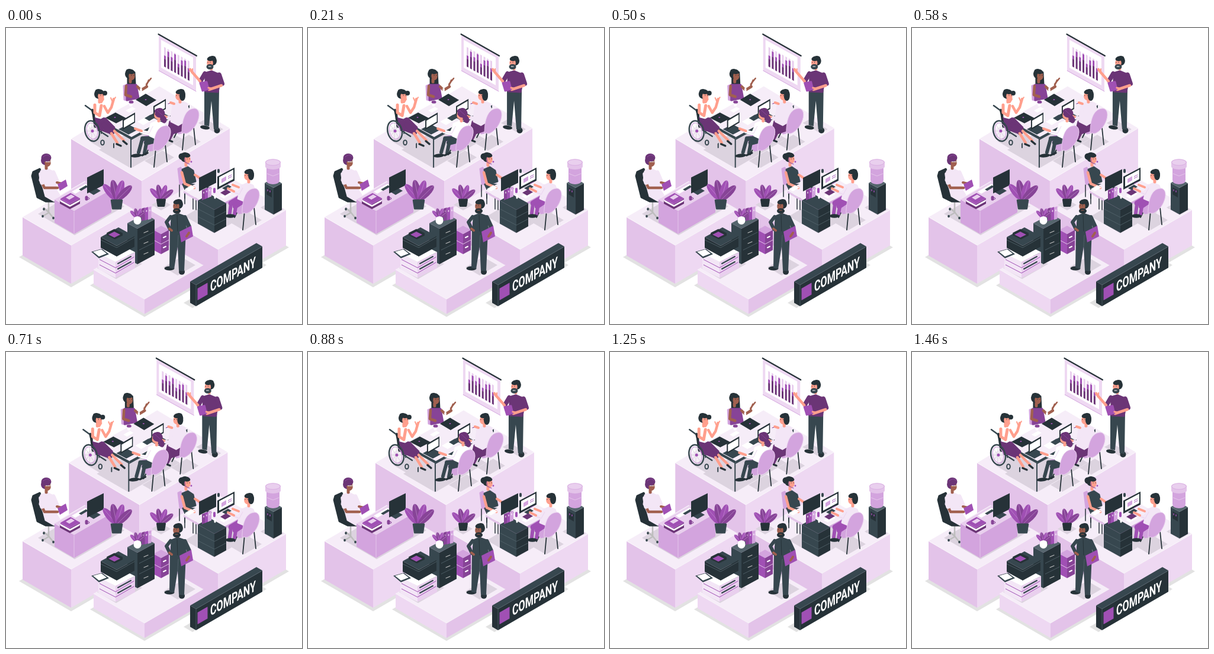
An HTML page with a canvas that plays this animation: 500 by 500 pixels, repeating every 1500 ms.

```html
<!DOCTYPE html>
<html lang="en">
<meta charset="utf-8">
<title>Company office</title>
<style>
html, body { margin: 0; width: 100%; height: 100%; overflow: hidden; background: #fff; }
canvas { display: block; width: 100vw; height: 100vh; }
</style>
<canvas id="stage" width="500" height="500"></canvas>
<script>
const ctx = document.getElementById('stage').getContext('2d');
const dark = '#263238', slate = '#37474f', steel = '#55656d', grey = '#bdbdbd', ground = '#e2e2e2', shade = '#dcd3df';
const purple = '#a050b4', plum = '#6b3576', grape = '#874497', lilac = '#d3a4de', white = '#fff';
const wallL = '#e3c3e9', wallR = '#eed8f2', floor = '#f6edf8', pale = '#e9cfee', shirt = '#f3e6f6';
const skin = '#ff9f8d', brown = '#a1604f', ISO = .58;
ctx.lineCap = ctx.lineJoin = 'round';

// Drawing helpers; points are flat x, y lists.
function trace(points) {
  ctx.beginPath();
  for (let i = 0; i < points.length; i += 2) ctx.lineTo(points[i], points[i + 1]);
}
function shape(color, ...points) {
  trace(points);
  ctx.fillStyle = color;
  ctx.fill();
}
function line(color, width, ...points) {
  trace(points);
  ctx.strokeStyle = color;
  ctx.lineWidth = width;
  ctx.stroke();
}
function dot(color, x, y, rx, ry = rx, turn = 0) {
  ctx.beginPath();
  ctx.ellipse(x, y, rx, ry, turn, 0, 7);
  ctx.fillStyle = color;
  ctx.fill();
}
function ring(color, width, x, y, rx, ry, turn = 0) {
  ctx.beginPath();
  ctx.ellipse(x, y, rx, ry, turn, 0, 7);
  ctx.strokeStyle = color;
  ctx.lineWidth = width;
  ctx.stroke();
}
// A polygon with softened corners.
function soft(color, ...points) {
  shape(color, ...points);
  ctx.closePath();
  ctx.strokeStyle = color;
  ctx.lineWidth = 3;
  ctx.stroke();
}
function at(x, y, draw) {
  ctx.save();
  ctx.translate(x, y);
  draw();
  ctx.restore();
}
// Isometric pieces: (x, y) is the front corner, a runs to the left and b to the right.
function flat(color, x, y, a, b, slope = ISO) {
  shape(color, x, y, x - a, y - a * slope, x - a + b, y - (a + b) * slope, x + b, y - b * slope);
}
function wall(color, x, y, width, height, slope = ISO) {
  const end = y - width * slope;
  shape(color, x, y, x + width, end, x + width, end + height, x, y + height);
}
function box(x, y, a, b, h, left, right, top, slope = ISO) {
  wall(left, x, y, -a, h, -slope);
  wall(right, x, y, b, h, slope);
  flat(top, x, y, a, b, slope);
}
function tier(x, y, a, b, h, left, right, slope) {
  box(x, y, a, b, h, left, right, floor, slope);
  line('#ffffffb0', .8, x - a, y - a * slope, x, y, x + b, y - b * slope);
}
function head(x, y, tone, hair, facing) {
  line(tone, 5, x - facing, y, x - facing, y + 11);
  dot(hair, x - facing * 2.5, y - 2.5, 7.5, 8);
  dot(tone, x + facing * 1.5, y + 1, 5.3, 7.2);
  dot(hair, x - facing, y - 6.5, 7.5, 4.2, facing * .2);
  for (const dx of [1, 5]) dot(dark, x + facing * dx, y, .6, .8);
}
function leaf(color, x, y, length, angle) {
  const cx = x + Math.sin(angle) * length / 2, cy = y - Math.cos(angle) * length / 2;
  dot(color, cx, cy, length / 5.5, length / 2, angle);
  line(lilac, .5, x, y, 2 * cx - x, 2 * cy - y);
}
function plant(x, y, length, spread, pot) {
  for (let i = 0; i < 4; i++) leaf(i % 2 ? grape : purple, x, y, length, (i - 1.4) * spread);
  soft(pot, x - length * .25, y, x + length * .25, y, x + length * .19, y + length * .4, x - length * .19, y + length * .4);
}
function chair() {
  line(dark, 1.8, 253, 203, 250, 235);
  line(dark, 1.8, 269, 197, 272, 226);
  line(dark, 1.8, 243, 200, 236, 214);
  soft(lilac, 231, 185, 239, 182, 260, 190, 256, 204, 244, 207, 238, 202);
  chairBack();
}
function chairBack() {
  ctx.beginPath();
  ctx.moveTo(249, 206);
  ctx.bezierCurveTo(249, 188, 253, 166, 270, 165);
  ctx.bezierCurveTo(286, 166, 276, 200, 257, 207);
  ctx.closePath();
  ctx.fillStyle = lilac;
  ctx.fill();
  ctx.strokeStyle = pale;
  ctx.lineWidth = .8;
  ctx.stroke();
}
function laptop(x, y) {
  flat(slate, x + 10, y + 25, 17, 16, .53);
  wall(dark, x, y, 21, 17);
  wall(white, x + 2, y + 1.5, 17.5, 12);
}
function screenBack(x, y, width, height) {
  line(slate, 3, x + width / 2, y + height / 2, x + width / 2, y + height - 2);
  wall(dark, x, y, width, height, .5);
}

function board() {
  wall(wallR, 258, 12, 63, 60, -.55);
  wall(white, 262, 20, 54, 47, -.55);
  [19, 29, 23, 31, 18, 27, 30, 20].forEach((height, i) => {
    const x = 267 + i * 5.7, base = 65 + i * 3.2, tip = height * .3;
    wall(pale, x, base - 33, 3, 33, -ISO);
    wall(purple, x, base - height, 3, tip, -ISO);
    wall(plum, x, base - height + tip, 3, height - tip, -ISO);
  });
  line(lilac, 1, 258, 72, 321, 107);
  line(dark, 2.2, 257.5, 10.5, 322, 47);
}
function presenter() {
  flat(shade, 355, 178, 30, 12);
  dot(dark, 336, 168, 8, 3.4, .15);
  dot(dark, 356.5, 173, 5, 5);
  shape(slate, 335, 105, 360, 105, 359, 172, 351, 171, 347, 123, 343, 166, 335, 164);
  soft(plum, 337, 76, 347, 73, 359, 78, 361, 92, 358, 108, 337, 107);
  line(plum, 7.5, 336, 77, 329, 89);
  line(skin, 4.5, 328, 90, 314, 74, 311, 70);
  line(skin, 2, 315, 75, 315, 69);
  line(plum, 8, 360, 79, 365, 94);
  line(skin, 4.5, 364, 97, 343, 104);
  soft(purple, 328, 93, 339, 91, 342, 103, 332, 106);
  line(skin, 3, 342, 101, 346, 102);
  head(346, 58, skin, dark, -1);
  dot(slate, 344.5, 65.5, 6, 4.6);
  line(white, 1, 342, 65, 346, 65);
}
function speaker() {
  soft(lilac, 199, 98, 204, 96, 206, 122, 200, 121);
  soft(dark, 206, 76, 217, 75, 218, 94, 206, 94);
  head(211, 80, brown, dark, 1);
  soft(grape, 204, 96, 220, 96, 224, 118, 204, 122);
  line(brown, 4.5, 203, 98, 202, 113, 211, 116);
  line(brown, 4.5, 222, 99, 228, 105, 238, 99);
  line(brown, 2.5, 236, 100, 241, 88);
  line(brown, 2.5, 237, 95, 245, 85);
}
function table() {
  flat(shade, 211, 237, 54, 86);
  for (const [x, y, h] of [[161, 155, 24], [182, 169, 33], [211, 188, 47], [302, 139, 26]]) line(slate, 2, x, y, x, y + h);
  box(212, 184, 53, 98, 5, slate, slate, floor, .55);
  flat(white, 232, 164, 10, 16);
  flat(white, 208, 143, 6, 11);
  flat(dark, 186, 161, 18, 17, .52);
  flat(dark, 237, 132, 18, 17, .6);
  dot(purple, 184, 151, 1.5, 1);
  dot(purple, 236, 121, 1.5, 1);
  laptop(197, 155);
  laptop(249, 132);
  flat(slate, 242, 157, 8, 10);
  line(grape, 1.2, 274, 128, 280, 126);
  line(white, 5, 211, 125, 211, 130);
  dot(grape, 211.5, 125, 4, 2.6);
  line(white, 3.5, 228, 103, 228, 107);
}
function wheelchairGuest() {
  flat(shade, 164, 205, 24, 32);
  line(slate, 2.5, 134, 131, 145, 139, 155, 172, 172, 183);
  soft(dark, 146, 138, 151, 141, 157, 167, 150, 167);
  soft(plum, 151, 151, 168, 153, 183, 168, 180, 179, 155, 170);
  line(plum, 7, 165, 163, 178, 177);
  line(skin, 4.5, 178, 178, 188, 194);
  line(skin, 4.5, 183, 174, 199, 190);
  line(dark, 3.5, 187, 196, 194, 199);
  line(dark, 3.5, 198, 191, 204, 196);
  soft(white, 150, 129, 158, 125, 166, 129, 169, 147, 160, 152, 152, 150);
  line(skin, 5, 150, 130, 150, 143, 158, 148, 161, 131);
  line(skin, 4.5, 166, 132, 172, 143, 178, 134, 182, 120);
  line(skin, 2, 180, 125, 177, 118);
  line(skin, 2, 181, 123, 185, 117);
  head(159, 114, skin, dark, 1);
  dot(dark, 167, 110, 4);
  line(skin, 4, 161, 125, 164, 120);
  ring(slate, 2.5, 145.5, 174, 12, 17.5, -.25);
  ring(lilac, 1.2, 145.5, 174, 9, 14, -.25);
  for (let i = 0; i < 4; i++) {
    const dx = Math.cos(i * .8) * 9, dy = Math.sin(i * .8) * 13;
    line(grey, .5, 145 - dx, 174 - dy, 145 + dx, 174 + dy);
  }
  dot(purple, 146, 174, 2.5);
  ring(slate, 2, 163, 193.5, 2.8, 4);
}
function guestInLilac() {
  flat(shade, 303, 207, 20, 26);
  at(48, -29, chair);
  soft(plum, 277, 158, 302, 159, 303, 171, 282, 178, 276, 190, 271, 184);
  line(dark, 3, 276, 190, 281, 192);
  soft(shirt, 282, 130, 293, 125, 305, 128, 309, 142, 306, 155, 291, 164, 279, 158);
  line(shirt, 6, 284, 132, 280, 153, 271, 151);
  line(skin, 4, 271, 150, 266, 148);
  line(skin, 4, 284, 128, 278, 126);
  head(293, 114, skin, dark, -1);
  dot(dark, 298, 115, 5, 8);
  at(48, -29, chairBack);
}
function guestInWhite() {
  flat(shade, 254, 236, 20, 30);
  chair();
  line(slate, 8, 253, 190, 237, 194);
  line(slate, 8, 250, 186, 231, 187);
  line(slate, 6, 230, 188, 224, 210);
  line(slate, 6, 237, 195, 234, 211);
  dot(dark, 220, 215.5, 9.5, 3, -.1);
  line(dark, 3.5, 230, 215, 239, 211);
  soft(white, 245, 162, 255, 158, 265, 161, 270, 168, 267, 178, 256, 188, 243, 182);
  line(white, 6, 247, 164, 241, 178, 229, 175);
  line(pale, .8, 248, 166, 242, 178, 230, 176);
  line(skin, 4, 229, 174, 218, 170);
  head(257, 146, skin, plum, -1);
  dot(plum, 260, 144, 8.5, 7.5);
  dot(plum, 266, 154, 5, 7, -.4);
  line(grape, 1, 255, 139, 264, 147);
  chairBack();
}
function meeting() {
  tier(229, 258, 119, 149, 100, wallL, wallR, .595);
  board();
  presenter();
  speaker();
  table();
  wheelchairGuest();
  guestInLilac();
  guestInWhite();
}

function manager() {
  line(grey, 2.5, 72, 293, 72, 312, 62, 318);
  line(grey, 2.5, 64, 304, 72, 311, 80, 321);
  for (const [x, y] of [[62, 318], [80, 321], [64, 306]]) dot(slate, x, y, 1.8, 2.2);
  soft(dark, 44, 250, 46, 243, 57, 238, 60, 246, 66, 276, 84, 283, 82, 293, 67, 293, 53, 286);
  soft(shirt, 63, 269, 83, 271, 90, 282, 81, 292, 67, 284);
  soft(shirt, 59, 242, 69, 238, 78, 242, 86, 261, 82, 271, 64, 271, 57, 257);
  line(brown, 4.5, 61, 262, 65, 270, 87, 270);
  line(shirt, 7.5, 59, 247, 61, 261);
  line(shirt, 7, 80, 244, 86, 258);
  line(brown, 4, 86, 261, 95, 263);
  shape(purple, 87, 264, 101, 256, 104, 267, 91, 275);
  head(69, 226, brown, plum, 1);
  dot(plum, 68, 219, 8.5, 7);
  line(grape, 1, 62, 218, 69, 214, 75, 217);
  line(white, 1, 67, 226, 76, 226);
}
function deskTier() {
  tier(110, 367, 82, 105, 65, wallL, wallR, ISO);
  flat(shade, 116, 350, 62, 84);
  manager();
  box(115, 309, 33, 63, 39, lilac, lilac, pale);
  line(pale, .8, 115, 310, 115, 347);
  flat(white, 117, 280, 6, 23);
  flat(slate, 127, 275, 4, 12);
  flat(slate, 148, 282, 11, 12);
  screenBack(137, 252.5, 28, 27);
  box(108, 302, 17, 17, 4, plum, plum, plum, .55);
  box(108, 299, 16, 16, 3, white, white, white, .55);
  box(108, 297, 16, 17, 2, purple, grape, purple, .55);
  flat(pale, 107, 290, 6, 9);
  line(grape, 5, 136, 286, 136, 289);
  ring(grape, 1, 139, 288, 1.8, 1.5);
  plant(187, 291, 35, .5, slate);
}

function teammate() {
  for (const [x, y] of [[293, 265], [302, 268], [316, 286], [321, 287]]) line(dark, 1.5, x, y, x, y + 20);
  soft(lilac, 291, 238, 295, 236, 300, 243, 303, 266, 294, 263);
  soft(slate, 299, 264, 322, 265, 324, 279, 306, 279);
  soft(slate, 298, 239, 307, 235, 316, 241, 320, 259, 302, 265);
  dot(dark, 297, 217, 5.5);
  head(305, 221, skin, dark, 1);
  dot(purple, 313, 226, 1.4);
  line(grape, 1, 302, 219, 303, 227, 310, 230);
}
function engineer() {
  at(150, 106, chair);
  line(purple, 9, 397, 286, 380, 296);
  line(purple, 9, 402, 291, 387, 301);
  line(purple, 6, 380, 297, 378, 313);
  line(purple, 6, 388, 302, 386, 314);
  dot(dark, 379, 317.5, 8.5, 3.2);
  soft(shirt, 399, 266, 408, 262, 417, 266, 420, 274, 418, 286, 404, 293, 392, 288);
  line(shirt, 6, 399, 267, 393, 280, 386, 277);
  line(pale, .8, 400, 270, 394, 281, 386, 278);
  line(skin, 4, 385, 276, 375, 271);
  line(skin, 4, 393, 269, 383, 265);
  head(409, 249, skin, dark, -1);
  dot(dark, 414, 249, 5, 8);
  at(150, 106, chairBack);
}
function workstation() {
  wall(wallL, 352, 305, -52, 4, -ISO);
  wall(lilac, 352, 305, 48, 4);
  flat(floor, 352, 304, 53, 48, .55);
  line(dark, 1.5, 302, 280, 302, 297);
  line(skin, 4.5, 297, 244, 302, 263, 318, 270);
  line(skin, 4, 319, 248, 328, 254);
  flat(white, 309, 276, 7, 11);
  box(352, 307, 28, 20, 39, slate, dark, slate, .55);
  for (const y of [320, 333]) line(steel, .8, 325, y - 14, 352, y, 371, y - 10);
  flat(slate, 338, 277, 5, 10);
  screenBack(326, 253, 29, 23);
  flat(slate, 371, 274, 6, 10);
  wall(dark, 357, 251, 29, 22, .53);
  wall(white, 360, 252, 24, 16, .53);
  wall(lilac, 364, 255, 8, 7);
  for (const y of [251, 254, 263]) line(purple, .9, 375, y, 381, y - 3);
  [grape, purple, lilac].forEach((color, i) => {
    wall(color, 331 + i * 5, 274 - i * 2, 6, 17, .4);
    line(white, 1.2, 334 + i * 5, 277 - i * 2, 334 + i * 5, 279 - i * 2);
  });
  line(purple, 4, 352, 272, 352, 277);
  line(white, 3, 353, 283, 353, 287);
  line(slate, 4, 359, 240, 359, 243);
  flat(white, 368, 288, 7, 13);
  flat(plum, 370, 283, 8, 10);
}
function cooler() {
  flat(shade, 452, 316, 22, 17);
  box(452, 270, 15, 14, 45, slate, dark, steel, .55);
  dot(lilac, 451, 259, 10.5, 5);
  shape(lilac, 440, 236, 462, 236, 462, 258, 440, 258);
  shape(wallL, 438, 227, 464, 227, 464, 234, 438, 234);
  dot(wallL, 451, 234, 13, 5);
  dot(pale, 451, 227, 13, 5.5);
  ring(lilac, .8, 451, 227, 12.5, 5.2);
  line(pale, .8, 441, 246, 451, 250, 461, 246);
  wall(dark, 440, 269, 9, 12, -ISO);
  for (const x of [442, 446]) line(purple, 1.5, x, x / 2 + 52, x, x / 2 + 54);
}
function teamTier() {
  tier(358, 374, 117, 115, 60, wallL, wallR, ISO);
  flat(shade, 262, 308, 16, 16);
  flat(shade, 352, 347, 50, 62);
  flat(shade, 402, 342, 22, 30);
  plant(262, 290, 26, .55, dark);
  teammate();
  workstation();
  cooler();
  engineer();
}

function printer() {
  box(185, 395, 29, 33, 27, shirt, pale, white, .5);
  for (const y of [405, 414]) line(purple, 1, 158, y - 14, 185, y, 216, y - 18);
  for (const y of [398, 407]) line(slate, 2, 189, y, 211, y - 12);
  box(187, 368, 27, 30, 18, dark, dark, slate, .55);
  line(steel, .8, 160, 358, 187, 371, 217, 354);
  box(184, 353, 14, 13, 4, dark, dark, dark, .5);
  flat(purple, 183, 354, 10, 10, .5);
  shape(slate, 144, 378, 162, 373, 174, 382, 157, 389);
  shape(white, 147, 378, 161, 374, 170, 381, 157, 386);
}
function cabinet() {
  box(262, 348, 13, 13, 34, purple, grape, lilac, .54);
  line(pale, .9, 249, 358, 262, 365, 275, 358);
  for (const y of [354, 371]) line(white, 2, 266, y, 270, y - 2);
  box(222, 339, 17, 29, 60, slate, dark, steel, .54);
  for (const y of [357, 375]) line(steel, .8, 225, y, 249, y - 12);
  for (const y of [346, 364, 382]) line(grey, 1.2, 233, y, 240, y - 3);
  [grape, purple, lilac].forEach((color, i) => {
    wall(color, 229 + i * 5.5, 305 - i, 5.5, 21, .3);
    line(white, 1.2, 232 + i * 5.5, 309 - i, 232 + i * 5.5, 311 - i);
  });
  plant(222, 321, 17, .55, white);
  dot(white, 222, 325, 6.5, 7);
}
function director() {
  dot(dark, 276, 406, 8.5, 3.6);
  dot(dark, 297, 412, 5, 4.8);
  shape(slate, 277, 342, 304, 342, 301, 411, 292, 410, 290, 369, 284, 407, 276, 405);
  line(steel, .8, 291, 350, 290, 369);
  soft(slate, 280, 318, 290, 314, 301, 318, 304, 342, 291, 345, 279, 343);
  line(slate, 6, 278, 319, 271, 328, 277, 340);
  line(brown, 4, 276, 339, 280, 342);
  line(slate, 7.5, 302, 320, 309, 335, 309, 345);
  shape(purple, 293, 344, 313, 334, 316, 352, 296, 362);
  line(brown, 4, 309, 346, 305, 352);
  line(dark, 1, 289, 316, 290, 343);
  head(289, 300, brown, dark, -1);
  dot(dark, 288.5, 309, 6.5, 4.5);
  line(brown, 1.2, 286, 308, 290, 308);
}
function printTier() {
  tier(234, 458, 86, 99, 25, wallR, wallL, ISO);
  flat(shade, 186, 424, 32, 44);
  flat(shade, 290, 418, 24, 30);
  cabinet();
  printer();
  director();
}
function sign() {
  box(321, 434, 10, 112, 36, dark, dark, slate);
  line(steel, .7, 321, 469, 321, 434, 432, 370);
  wall(purple, 323.5, 440, 17, 20);
  ctx.save();
  ctx.transform(.66, -.37, 0, 1, 345, 446);
  ctx.font = '700 24.5px Roboto, sans-serif';
  ctx.fillStyle = white;
  ctx.fillText('COMPANY', 0, 0);
  ctx.restore();
}

// cubic-bezier(.25, .1, .25, 1)
function ease(progress) {
  const bezier = (a, b, s) => 3 * a * s * (1 - s) ** 2 + 3 * b * s * s * (1 - s) + s ** 3;
  let low = 0, high = 1;
  for (let i = 0; i < 20; i++) {
    const mid = (low + high) / 2;
    if (bezier(.25, .25, mid) < progress) low = mid; else high = mid;
  }
  return bezier(.1, 1, low);
}

const shake = [0, -1, 2, -4, 4, -4, 4, -4, 2, -1, 0];

function frame() {
  const position = performance.now() % 1500 / 150, step = Math.floor(position);
  const x = shake[step] + (shake[step + 1] - shake[step]) * ease(position - step);
  ctx.fillStyle = white;
  ctx.fillRect(0, 0, 500, 500);
  flat(ground, 110, 438, 88, 105);
  flat(ground, 358, 440, 110, 120);
  flat(ground, 234, 488, 92, 108);
  flat(ground, 315, 473, 15, 125);
  at(x, 0, meeting);
  deskTier();
  teamTier();
  printTier();
  sign();
  requestAnimationFrame(frame);
}
frame();
</script>
</html>
```
